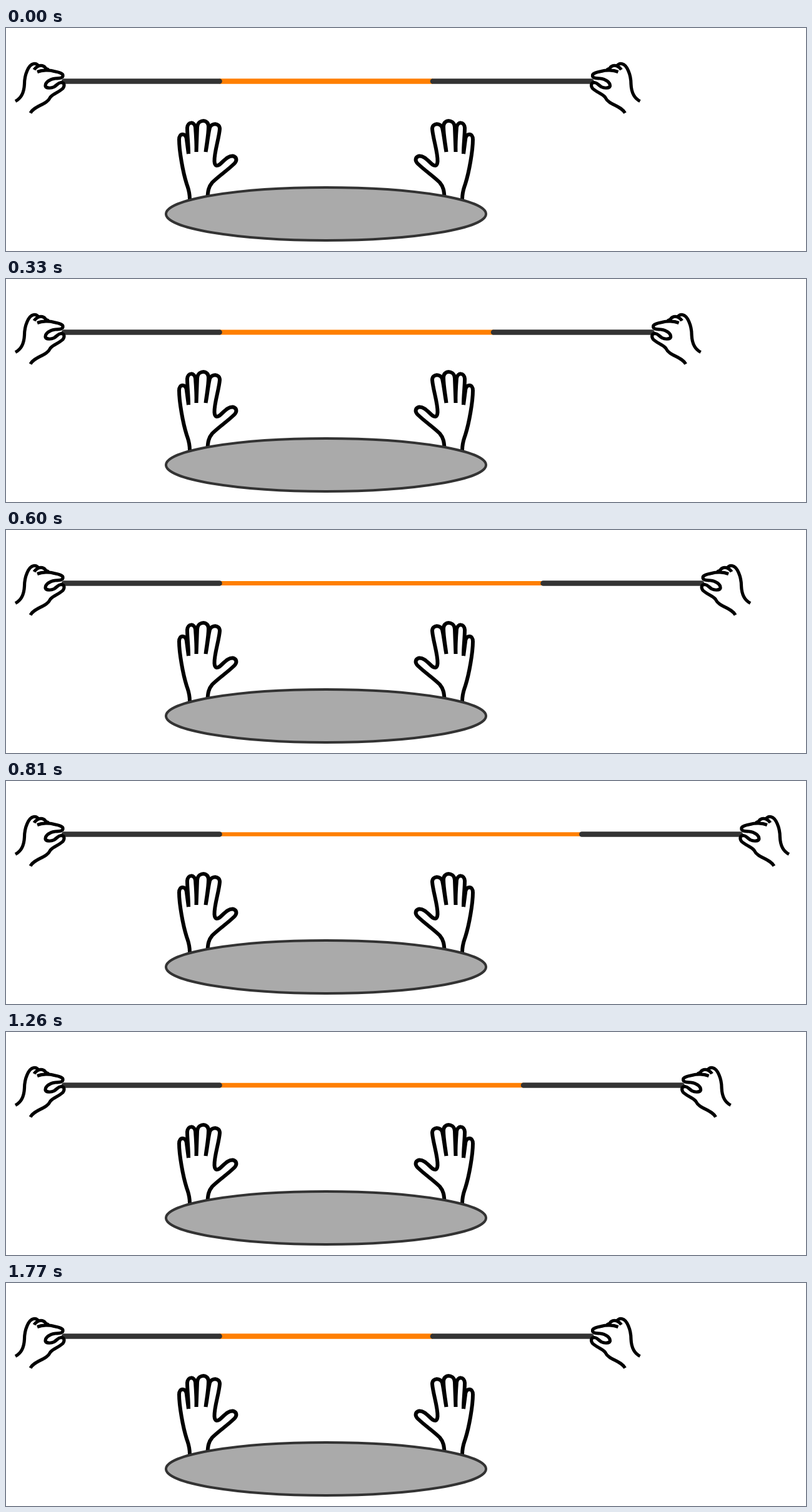
An HTML page with a canvas for the animation above (1800 ms loop, 1280 px wide and 358 px high).

```html
<!DOCTYPE html>
<html lang="en">
<head>
<meta charset="utf-8">
<title>Stretching band</title>
<style>
html, body { margin: 0; width: 100%; height: 100%; overflow: hidden; background: #fff; }
canvas { display: block; }
</style>
</head>
<body>
<canvas id="stage" width="1280" height="358"></canvas>
<script>
const ctx = document.getElementById('stage').getContext('2d');

const LOOP = 1800, STEP = 30;
const PEAK = 29, LAST = 59;   // steps at full stretch and back at rest
const REACH = 256;
const BAR_Y = 85.5, BAR_W = 8.6;
const INK = '#333';

const pinch = new Path2D(`
  M15 117.5 C26 112 29 102 29.5 90 C29.5 75 36 59 44 57.5 C48 56.5 50 58 52 61
  M45 67 C48 62 54 59.5 58 60.5 C62 61.5 63 63 64 66 C65 65 67 66 68 67.5
  M50 70.5 C58 67.5 69 67 77 69.5 C85 71 92 73 91 77 C90.5 81 84 80.5 79 81
  C70 82 63 87 63 93 C64 97 72 97 77 94.5 C82 91.5 83 88 88 87.5
  C94 87.5 94 93 91 97 C85 103 76 105 71 111 C65 124 46 124 39 136.5`);

const palm = new Path2D(`
  M294 275 C294 263 292 259 289 250 C283 231 277 197 277 179 C277 168 288 168 289 179 L292 202
  M292 202 C292 186 290 174 290 160 C291 150 301 150 303 159 C304 172 305 185 304.5 199
  M304.5 199 L306 159 C307 146 324 146 324 158 C324 172 321 185 319.5 199
  M319.5 199 C322 187 323 173 326 160 C329 152 342 152 342 162
  C341 177 333 199 333.5 214 C334 222 338 222 342 219
  C350 212 355 205 363 205.5 C369 207 370 212 366 217
  C355 228 340 238 330 248 C324 255 323 262 322.5 272`);

function drawHand(path, width, mirrorX) {
  ctx.save();
  if (mirrorX !== undefined) {
    ctx.translate(mirrorX, 0);
    ctx.scale(-1, 1);
  }
  ctx.strokeStyle = '#000';
  ctx.lineWidth = width;
  ctx.lineCap = 'butt';
  ctx.lineJoin = 'round';
  ctx.stroke(path);
  ctx.restore();
}

function line(x1, x2, color, width, cap) {
  ctx.strokeStyle = color;
  ctx.lineWidth = width;
  ctx.lineCap = cap;
  ctx.beginPath();
  ctx.moveTo(x1, BAR_Y);
  ctx.lineTo(x2, BAR_Y);
  ctx.stroke();
}

function drawTable() {
  ctx.beginPath();
  ctx.ellipse(512, 298.5, 256, 42.5, 0, 0, Math.PI * 2);
  ctx.fillStyle = '#aaa';
  ctx.fill();
  ctx.strokeStyle = INK;
  ctx.lineWidth = 4;
  ctx.stroke();
}

function stretchAt(time) {
  const step = Math.floor((time % LOOP) / STEP + 1e-6);
  return step <= PEAK ? step / PEAK : Math.max(0, (LAST - step) / (LAST - PEAK));
}

function draw() {
  const stretch = stretchAt(performance.now());
  const shift = REACH * stretch;

  ctx.fillStyle = '#fff';
  ctx.fillRect(0, 0, 1280, 358);

  line(341.5, 683 + shift, '#ff7f00', 8.7 - 2.2 * stretch, 'butt');
  line(93, 341.5, INK, BAR_W, 'round');
  line(683 + shift, 936.5 + shift, INK, BAR_W, 'round');

  drawHand(pinch, 5.2);
  drawHand(pinch, 5.2, 1029.5 + shift);
  drawHand(palm, 6);
  drawHand(palm, 6, 1024);
  drawTable();

  requestAnimationFrame(draw);
}
draw();
</script>
</body>
</html>
```
